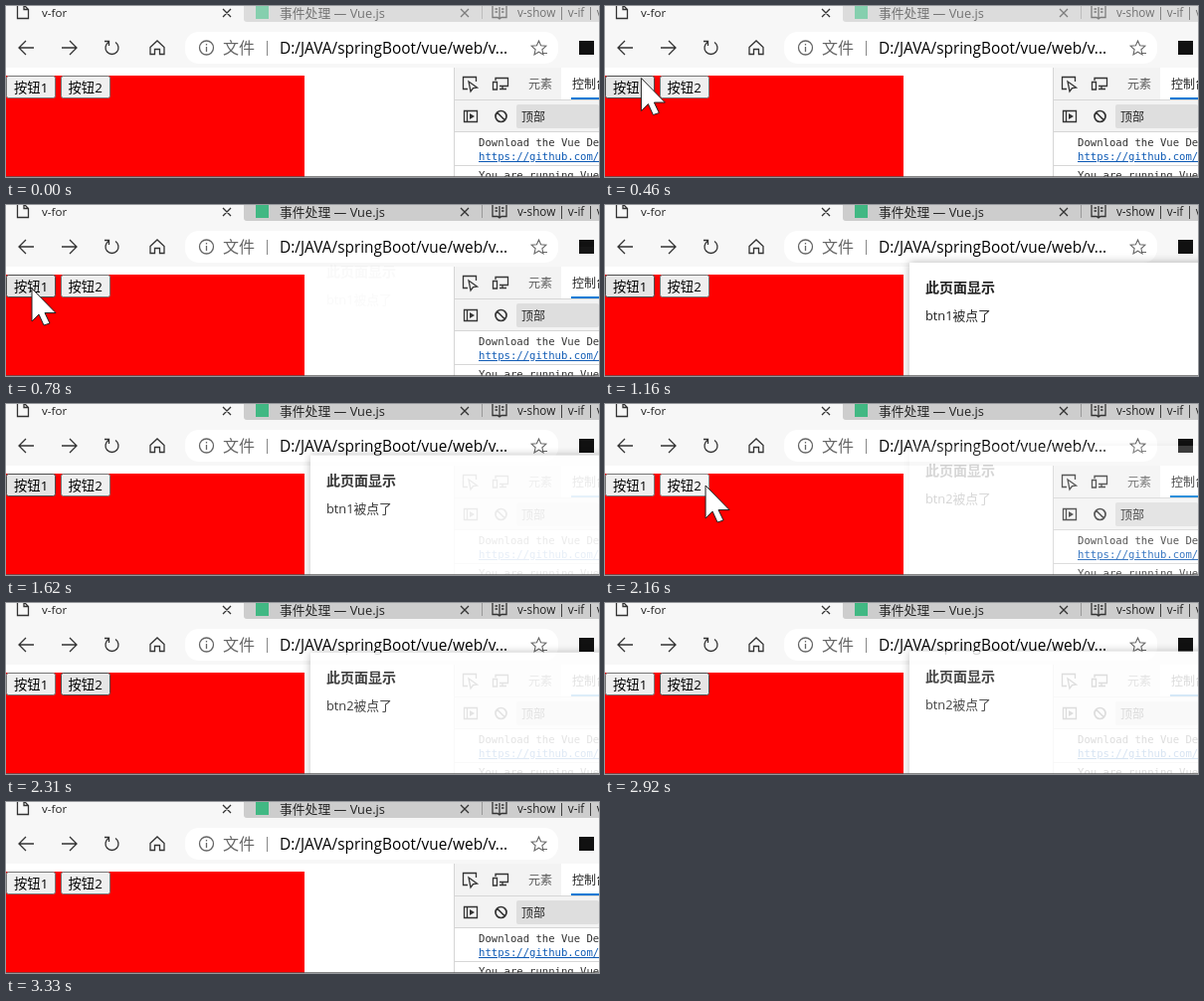
Animation, 596 px wide and 172 px high, one loop 4.18 s. Source, as an HTML page:

```html
<!DOCTYPE html>
<html lang="zh">
<head>
<meta charset="utf-8">
<title>v-for</title>
<style>
  html, body { margin: 0; width: 100%; height: 100%; overflow: hidden; background: #fff; }
  svg { display: block; width: 100vw; height: 100vh; }
  text { font: 12px 'Open Sans', 'Noto Sans CJK SC', 'Noto Sans CJK', sans-serif; fill: #222; white-space: pre; }
  .line { fill: none; stroke: #333; stroke-width: 1.3; }
  .button rect { fill: #efefef; stroke: #767676; }
  .button.hover rect { fill: #e5e5e5; stroke: #4f4f4f; }
  .button.active rect { fill: #f5f5f5; stroke: #8d8d8d; }
  .button text { font-size: 13.33px; fill: #000; }
  .mono text { font: 10.6px 'DejaVu Sans Mono', monospace; fill: #303030; }
  #panel { fill: #fff; filter: drop-shadow(0 0 4px rgba(0, 0, 0, .3)); }
</style>
</head>
<body>
<svg viewBox="0 0 596 172" preserveAspectRatio="none">
  <rect width="596" height="172" fill="#fff"/>

  <!-- tabs -->
  <rect width="596" height="62" fill="#f7f7f7"/>
  <path class="line" d="M11.5 -2V12.5H22.5V3.5L18 -1M18 -1V3.5H22.5M218 3l8 8m0 -8l-8 8"/>
  <text x="36" y="11" style="font-size:11.6px">v-for</text>
  <g id="strip">
    <path d="M239 0H596V16H242Q239 16 239 13Z" fill="#cdcdcd"/>
    <path class="line" d="M457 3l8 8m0 -8l-8 8"/>
    <path d="M478.5 0V13" stroke="#999"/>
    <rect x="251" y="0" width="13" height="13" fill="#41b883"/>
    <path class="line" d="M489 0V11.500H494L496 13L498 11.500H503V0M496 1V12M491.500 3h2.500m-2.500 3h2.500M498 3h2.500m-2.500 3h2.500"/>
    <text x="275" y="11.500" style="font-size:12.8px">事件处理 — Vue.js</text>
    <text x="514" y="11" style="font-size:11.7px">v-show | v-if | v-for</text>
  </g>

  <!-- toolbar -->
  <rect x="180" y="26" width="375" height="32" rx="14" fill="#fff"/>
  <path class="line" d="M28 42H13m7 -7l-7 7l7 7M56 42H71m-7 -7l7 7l-7 7"/>
  <path class="line" d="M103 36.500A6.500 6.500 0 1 0 110 36.500M99 35.500h4.500v4.500"/>
  <path class="line" d="M145 41.500L152 35l7 6.500V48.500H154.500V43.500H149.500V48.500H145Z"/>
  <circle class="line" cx="201.500" cy="42" r="7" style="stroke:#666"/>
  <path class="line" d="M201.500 41V46M201.500 38V39.500" style="stroke:#666"/>
  <text x="218" y="48" style="font-size:16px;fill:#666">文件</text>
  <path d="M262.500 35V50" stroke="#888"/>
  <text x="275" y="48" style="font-size:15.4px;fill:#000">D:/JAVA/springBoot/vue/web/v...</text>
  <path class="line" d="M535.500 35l2.100 4.800l5.200 .5l-3.900 3.500l1.100 5.100l-4.500 -2.700l-4.500 2.700l1.100 -5.100l-3.900 -3.500l5.200 -.5ZM539 47.500h5" style="stroke:#666;stroke-width:1.100"/>
  <rect x="576" y="35" width="15" height="14" fill="#111"/>

  <!-- page -->
  <rect y="70" width="300" height="102" fill="#f00"/>
  <g id="first"><rect x=".5" y="70.500" width="49" height="22" rx="2"/><text x="8" y="87">按钮1</text></g>
  <g id="second"><rect x="55.500" y="70.500" width="49" height="22" rx="2"/><text x="62.500" y="87">按钮2</text></g>

  <!-- developer tools -->
  <rect x="451" y="62" width="145" height="64" fill="#f3f3f3"/>
  <rect x="558" y="62" width="38" height="32" fill="#fff"/>
  <path d="M450.500 62V172M451 94.500H596M451 126.500H596M451 160.500H596" fill="none" stroke="#d6d6d6"/>
  <rect x="568" y="92" width="28" height="2" fill="#0078d4"/>
  <path class="line" d="M464 83.500H459.500V71.500H472.500V76M465 76l8.500 6l-4 .5l-2.500 3.500Z"/>
  <path class="line" d="M492 75V72.500H504.500V80.500H496M499 80.500V83.500M496 83.500H503M489.500 76.500h4v7.500h-4z"/>
  <text x="525" y="82.500" style="fill:#5a5a5a">元素</text>
  <text x="569" y="82.500">控制台</text>
  <path class="line" d="M460.500 105.500H473.500V116.500H460.500ZM463.500 105.500V116.500"/>
  <path d="M466 108l5 3l-5 3z" fill="#333"/>
  <path class="line" d="M492 111a5.500 5.500 0 1 0 11 0a5.500 5.500 0 1 0 -11 0M493.500 107l8 8" style="stroke-width:1.700"/>
  <rect x="513" y="99" width="83" height="24" rx="2" fill="#dedede"/>
  <text x="518" y="115.500">顶部</text>
  <g class="mono">
    <text x="475" y="141">Download the Vue Devtools</text>
    <text x="475" y="155" style="fill:#0f5bb5;text-decoration:underline">https://github.com/vuejs</text>
    <text x="475" y="174">You are running Vue in</text>
  </g>

  <g id="dialog">
    <rect id="panel" x="306" y="58" width="310" height="160"/>
    <text x="322" y="88" style="font-size:14px;font-weight:700">此页面显示</text>
    <text id="message" x="322" y="116" style="font-size:12.8px"></text>
  </g>
  <path d="M0 171.500H596" stroke="#555" stroke-opacity=".7"/>
  <path id="cursor" d="M0 0V33L7 26L12 37L18 35L13 24.500H24Z" fill="#fff" stroke="#222"/>
</svg>
<script>
const LOOP = 4180, CLICK_1 = 610, CLICK_2 = 2080;
const $ = id => document.getElementById(id);
const ease = p => { p = Math.min(1, Math.max(0, p)); return p * p * (3 - 2 * p); };

// Pointer key points: time, x, y. It leaves and returns below the stage.
const route = [
  [70, 225, 110], [400, 45, 63], [530, 26, 84], [840, 26, 84], [1110, 563, 175],
  [1640, 563, 175], [1760, 89, 73], [1930, 101, 82], [2160, 101, 82], [2310, 563, 175]
];

function pointerAt(t) {
  const next = route.findIndex(key => key[0] > t);
  if (next < 1) return [0, 200];
  const [t0, x0, y0] = route[next - 1], [t1, x1, y1] = route[next];
  const p = ease((t - t0) / (t1 - t0));
  return [x0 + (x1 - x0) * p, y0 + (y1 - y0) * p];
}

const shown = (t, open, close) => ease((t - open) / 300) * (1 - ease((t - close) / 160));

function buttonClass(t, enter, click, blur) {
  if (t < enter || t >= blur) return 'button';
  return t >= click && t < click + 100 ? 'button active' : 'button hover';
}

function draw() {
  const t = performance.now() % LOOP;
  const visible = shown(t, 755, 1590) + shown(t, CLICK_2, 2880);
  $('cursor').setAttribute('transform', `translate(${pointerAt(t)})`);
  $('strip').setAttribute('opacity', t < CLICK_1 ? .62 : 1); // the window gains focus on the first click
  $('dialog').setAttribute('opacity', visible);
  $('dialog').setAttribute('transform', `translate(0 ${-16 * (1 - visible ** 5)})`);
  $('message').textContent = `btn${t < CLICK_2 ? 1 : 2}被点了`;
  $('first').setAttribute('class', buttonClass(t, 460, CLICK_1, 1690));
  $('second').setAttribute('class', buttonClass(t, 1740, CLICK_2, 3330));
  requestAnimationFrame(draw);
}
draw();
</script>
</body>
</html>
```
